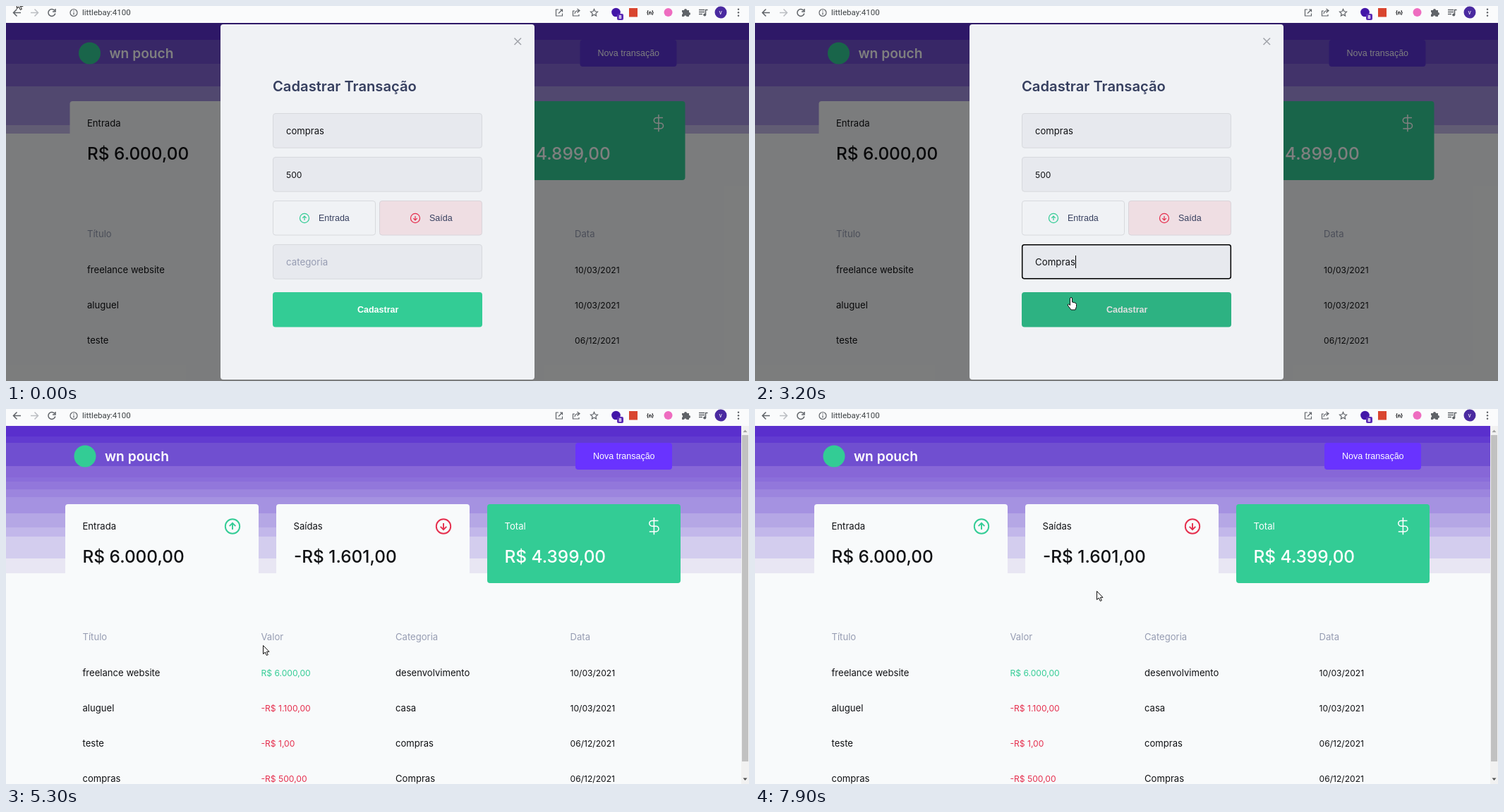
An HTML page that plays this animation: 1053x532 px, repeating every 8000 ms.

```html
<!DOCTYPE html>
<html lang="pt">
<head>
<meta charset="utf-8">
<title>Transações</title>
<style>
  html, body { margin: 0; width: 100%; height: 100%; overflow: hidden; }
  svg { display: block; width: 100%; height: 100%; }
  text { font: 13.1px Inter, sans-serif; fill: #101114; white-space: pre; }
  text.ui { font: 12.5px "Liberation Sans", Arial, sans-serif; }
  text.num { font-size: 12.1px; }
  text.big { font-size: 24.4px; font-weight: 500; }
  .icon { fill: none; stroke: #5f6368; stroke-width: 1.5; }
</style>
</head>
<body>
<svg id="stage" viewBox="0 0 1053 532"></svg>
<script>
const GREEN = '#33cc95', RED = '#e52e4d', MUTED = '#969cb2', INK = '#363f5f';

const text = (x, y, s, cls = '', style = '') =>
  `<text x="${x}" y="${y}" class="${cls}" style="${style}">${s}</text>`;
const fill = c => `fill:${c}`;
const rect = (x, y, w, h, color, r = 0, extra = '') =>
  `<rect x="${x}" y="${y}" width="${w}" height="${h}" rx="${r}" fill="${color}" ${extra}/>`;
const dot = (x, y, r, color) => `<circle cx="${x}" cy="${y}" r="${r}" fill="${color}"/>`;
const icon = (d, extra = '') => `<path class="icon" d="${d}" ${extra}/>`;
const group = (id, body) => `<g id="${id}">${body}</g>`;

// Circle with an arrow; dir is -1 for up, 1 for down
const arrowIcon = (x, y, dir, color, s = 1) =>
  `<g transform="translate(${x} ${y}) scale(${s} ${s * dir})" fill="none" stroke="${color}" stroke-width="1.9">
    <circle r="10.2"/><path d="M0 -4.5V4.5M-4.3 .3L0 4.6L4.3 .3"/></g>`;

const bands = list => list.map(([y, color], i) =>
  i < list.length - 1 ? rect(-10, y, 1073, list[i + 1][0] - y, color) : '').join('');

const fullBands = bands([[24, '#5a2fcd'], [39, '#623bd0'], [48, '#704fd0'], [81, '#8767d7'],
  [97, '#8b6eda'], [103, '#9277db'], [114, '#9c85de'], [125, '#a592e1'], [148, '#b5a7e5'],
  [168, '#c2b7ea'], [181, '#d3cdee'], [212, '#e8e6f3'], [233]]);
const dimBands = bands([[24, '#5c31d0'], [48, '#704fd0'], [82, '#8667d6'],
  [114, '#a391e0'], [169, '#c4b9ea'], [181]]);

const row = (y, title, value, category, date) =>
  text(108.5, y, title) +
  text(361.5, y, value, 'num', fill(value[0] === '-' ? RED : GREEN)) +
  text(552, y, category) + text(799.5, y, date, 'num');

const card = (x, color, label, ink) =>
  rect(x, 135, 274, 112, color, 4) + text(x + 24.5, 171, label, '', fill(ink));

const page =
  rect(-10, 24, 1073, 508, '#f8fafb') + group('full', fullBands) + group('dim', dimBands) +
  dot(112, 67, 15.5, GREEN) +
  text(140, 73.5, 'wn pouch', '', 'font-size:19.2px;font-weight:600;fill:#fff') +
  rect(807, 48, 137, 38, '#6933ff', 4, 'id="newButton"') +
  text(832, 71, 'Nova transação', 'ui', fill('#fff')) +
  card(84, '#f8fafb', 'Entrada') + text(108.5, 218, 'R$ 6.000,00', 'big') +
  arrowIcon(321, 166.5, -1, GREEN) +
  card(383, '#f8fafb', 'Saídas') + text(408, 218, '-R$ 1.601,00', 'big') +
  arrowIcon(620, 166.5, 1, RED) +
  card(682, GREEN, 'Total', '#fff') +
  '<text id="total" class="big" x="706.5" y="218" style="fill:#fff"></text>' +
  `<path transform="translate(905.2 153) scale(1.1)" fill="none" stroke="#fff" stroke-width="1.4"
    d="M12 1v22M17.5 5H9.5a3.5 3.5 0 0 0 0 7h5a3.5 3.5 0 0 1 0 7H6"/>` +
  [[108.5, 'Título'], [361.5, 'Valor'], [552, 'Categoria'], [799.5, 'Data']]
    .map(([x, s]) => text(x, 328, s, '', fill(MUTED))).join('') +
  row(378.5, 'freelance website', 'R$ 6.000,00', 'desenvolvimento', '10/03/2021') +
  row(428.5, 'aluguel', '-R$ 1.100,00', 'casa', '10/03/2021') +
  row(479, 'teste', '-R$ 1,00', 'compras', '06/12/2021') +
  group('newRow', row(529, 'compras', '-R$ 500,00', 'Compras', '06/12/2021'));

const scrollbar = rect(1042, 24, 11, 508, '#f1f1f1') + rect(1043, 37, 9, 463, '#c1c1c1') +
  '<path d="M1044.5 33h6l-3-3.5z" fill="#a3a3a3"/><path d="M1044.5 523.5h6l-3 3.5z" fill="#505050"/>';

const field = (y, id = '') =>
  rect(378.5, y + .5, 296, 48.7, '#e7e9ee', 3.5, `id="${id}" stroke="#d7d9dd"`);

const modal =
  rect(-10, 24, 1073, 508, 'rgba(0,0,0,.5)') +
  rect(304, 26, 445, 504, '#f0f2f5', 4) +
  icon('M720.5 45.5l9.5 9.5M730 45.5l-9.5 9.5', 'style="stroke:#a0a3a9"') +
  text(378, 121, 'Cadastrar Transação', '', `font-size:20.2px;font-weight:600;fill:${INK}`) +
  field(152) + text(397, 182, 'compras') +
  field(214) + text(397, 243.5, '500', 'num') +
  rect(378.5, 276.5, 145, 48.5, 'none', 3.5, 'stroke="#d7d9dd"') +
  arrowIcon(423, 301, -1, GREEN, .64) + text(443, 305, 'Entrada', 'ui', fill(INK)) +
  rect(529.5, 276.5, 145, 48.5, '#efdee3', 3.5, 'stroke="#d9d4da"') +
  arrowIcon(580, 301, 1, RED, .64) + text(600, 305, 'Saída', 'ui', fill(INK)) +
  field(338, 'category') +
  rect(378.7, 338.7, 295.6, 48, 'none', 3, 'id="focus" stroke="#000" stroke-width="1.5"') +
  '<text id="typed" x="397" y="367.5" style="font-size:13.3px"></text>' +
  rect(0, 354, 1, 18, '#000', 0, 'id="caret"') +
  group('submit', rect(378, 406, 297, 49.5, GREEN, 4) +
    text(498, 434.5, 'Cadastrar', 'ui', 'font-weight:700;fill:#fff'));

const toolbar =
  rect(0, 0, 1053, 24, '#fafbfc') +
  icon('M21 9.5H10.5M15.5 4.5l-5 5l5 5') +
  icon('M35 9.5h10.5M40.5 4.5l5 5l-5 5', 'style="stroke:#bbbec2"') +
  icon('M69 6.5a5 5 0 1 0 .8 4M70 4v4h-4') +
  '<g class="icon" style="stroke-width:1.2"><circle cx="96" cy="9.5" r="5"/><path d="M96 9v3.5M96 6.3v1.4"/></g>' +
  text(108, 13, 'littlebay:4100', '', 'font:11.5px Roboto,sans-serif;fill:#3c4043') +
  icon('M783 5h-3.5v9h9v-3.5M785 5h3.5v3.5M788 5.5l-5 5', 'style="stroke-width:1.2"') +
  icon('M806 7h-2.5v7h8.5v-2M806 11q.5-4.5 6-4.5M809.5 4l3.5 2.5l-3.5 3', 'style="stroke-width:1.2"') +
  icon('M833.5 4.5l1.5 3.3l3.5.4l-2.6 2.4l.7 3.5l-3.1-1.8l-3.1 1.8l.7-3.5l-2.6-2.4l3.5-.4z', 'style="stroke-width:1.2"') +
  dot(864.5, 9, 6.3, '#4316a8') + rect(866, 11, 9, 9, '#5b2bb5', 2) +
  text(868.3, 18.3, '8', '', 'font:700 7.5px Roboto,sans-serif;fill:#fff') +
  rect(883, 3, 12, 12.5, '#d9452f') +
  text(908, 12, '{n}', '', 'font:700 8px Roboto,sans-serif') +
  dot(938.5, 9, 6, '#ee6cc0') +
  '<path d="M958 6h3a2 2 0 1 1 4 0h3v3a2 2 0 1 1 0 4v2h-3.5a1.8 1.8 0 0 0-3.5 0h-3v-3a1.9 1.9 0 0 0 0-3.5z" fill="#5f6368"/>' +
  icon('M982 5.5h8M982 8.5h8M982 11.5h5M991.5 12.5V5.5h3') + dot(990.2, 12.5, 2, '#5f6368') +
  dot(1013, 9, 8.5, '#4a2aa0') + text(1010.5, 12, 'v', '', 'font:9px Roboto,sans-serif;fill:#fff') +
  [4.8, 9.3, 13.8].map(y => dot(1038, y, 1.2, '#5f6368')).join('');

const pointers =
  '<path id="arrow" d="M.5 .5V12.5L3.3 10L5.3 14.5L7.3 13.6L5.4 9.3H9z" fill="#fff" stroke="#111"/>' +
  '<path id="beam" d="M-3 7.5h6M0 -1v8" fill="none" stroke="#f5f6f8"/>' +
  `<path id="hand" transform="translate(-4.5 -1)" fill="#fff" stroke="#111"
    d="M4 2a1.5 1.5 0 0 1 3 0v5l4 1q2 .5 2 2.5v3l-1.5 4.5h-6l-4.5-6q-1-2 1-2l2 1.5z"/>`;

stage.innerHTML = group('page', page) + group('bar', scrollbar) + group('modal', modal) +
  toolbar + group('pointer', pointers);

const $ = id => document.getElementById(id);
const show = (id, on) => $(id).style.display = on ? '' : 'none';

const keyTimes = [1500, 1900, 2200, 2300, 2500, 2600, 2700];
const path = [[0, 15, -9], [500, 15, -9], [1000, 436, 379], [2900, 436, 379], [3300, 451, 425],
  [5100, 451, 425], [5600, 233, 201], [6300, 233, 201], [6400, 203, 157], [6500, 98, 42],
  [7000, 98, 42], [7200, 330, 240], [7300, 460, 284], [7400, 565, 280], [7500, 643, 262],
  [7600, 643, 262], [7900, 484, 258], [8000, 484, 258]];

function pointerAt(t) {
  const i = path.findIndex(p => p[0] > t);
  const [t0, x0, y0] = path[i - 1], [t1, x1, y1] = path[i];
  const k = (t - t0) / (t1 - t0);
  return [x0 + (x1 - x0) * k, y0 + (y1 - y0) * k].map(Math.round);
}

function draw() {
  const t = Math.floor(performance.now() % 8000 / 100) * 100;
  const open = t < 4200;
  const focused = t >= 1300 && t < 3600;

  // Closing the dialog brings the scrollbar back, which moves the page left
  $('page').setAttribute('transform', `translate(${open ? 6.5 : 0} 0)`);
  $('total').textContent = open ? 'R$ 4.899,00' : 'R$ 4.399,00';
  $('newButton').setAttribute('fill', open ? '#5a32d4' : '#6933ff');
  show('modal', open);
  show('dim', open);
  show('full', !open);
  show('newRow', !open);
  show('bar', !open);

  if (open) {
    const word = 'Compras'.slice(0, keyTimes.filter(k => k <= t).length);
    const typed = $('typed');
    typed.textContent = word || 'categoria';
    typed.style.fill = word ? '' : MUTED;
    show('focus', focused);
    show('caret', focused);
    $('caret').setAttribute('x', Math.round(397 + (word ? typed.getComputedTextLength() : 0)));
    const hover = Math.min(1, Math.max(0, (t - 3000) / 300));
    $('submit').style.filter = `brightness(${1 - .19 * hover})`;
  }

  const [x, y] = pointerAt(t);
  const kind = open && t >= 1000 ? (t < 3200 ? 'beam' : 'hand') : 'arrow';
  for (const id of ['arrow', 'beam', 'hand']) show(id, id === kind);
  $('pointer').setAttribute('transform', `translate(${x} ${y})`);
  requestAnimationFrame(draw);
}
draw();
</script>
</body>
</html>
```
